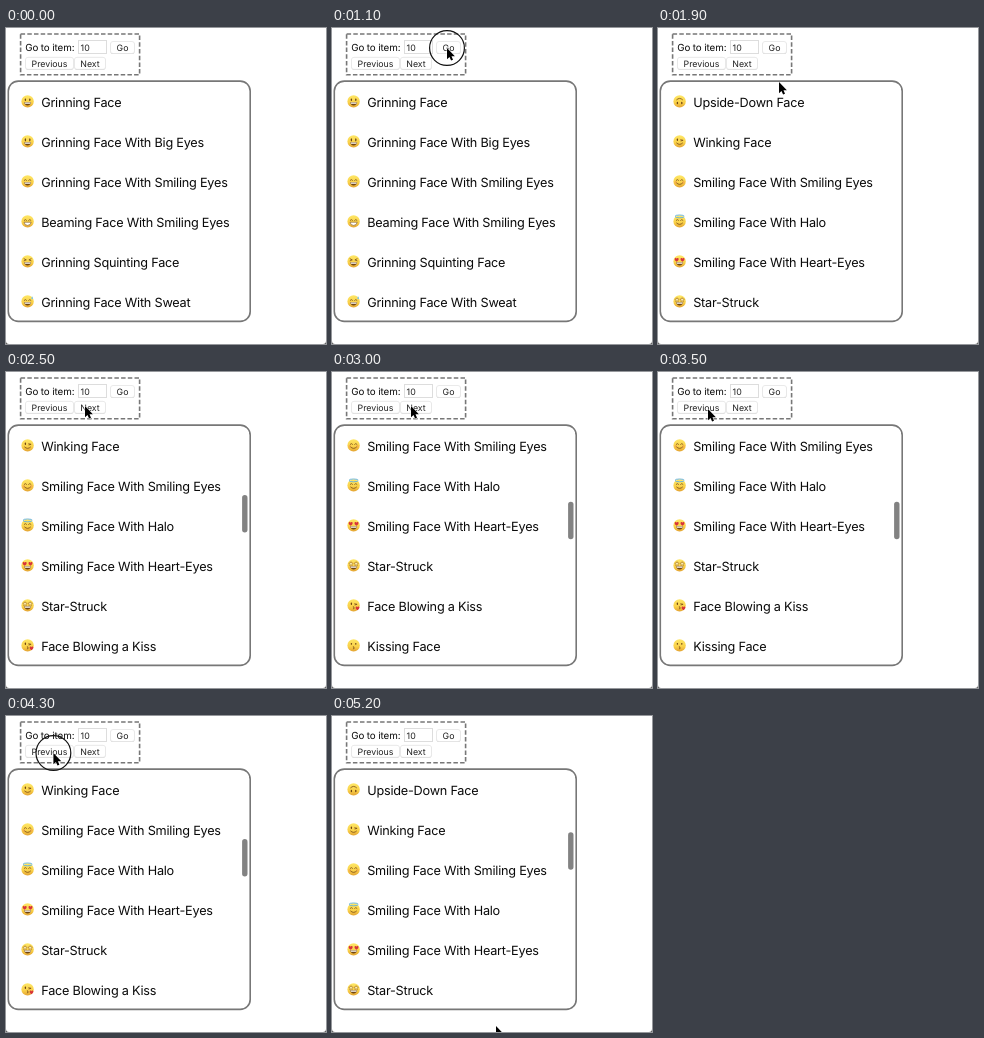
Animation of 320 by 316 pixels, one loop 5300 ms. Source, as an HTML page:

```html
<!DOCTYPE html>
<html lang="en">
<head>
<meta charset="utf-8">
<title>Scroll to item</title>
<style>
  html, body { margin: 0; width: 100%; height: 100%; overflow: hidden; background: #fff; }
  svg { display: block; width: 320px; height: 316px; }
  text { font-family: Inter, Roboto, "Liberation Sans", sans-serif; fill: #0a0a0a; text-rendering: geometricPrecision; }
  .row { font-size: 12.7px; letter-spacing: -.23px; }
  .label { font-size: 9.8px; letter-spacing: -.1px; }
  .small { font-size: 8.8px; fill: #222; }
  .line { fill: none; stroke: #7a4d17; stroke-width: .8; stroke-linecap: round; }
  .dark { fill: #6f4413; }
  .frame { fill: none; stroke: #777; stroke-width: 1.6; }
</style>
</head>
<body>
<svg viewBox="0 0 320 316" xmlns="http://www.w3.org/2000/svg">
  <defs>
    <linearGradient id="skin" x1="0" y1="0" x2="0" y2="1">
      <stop offset="0" stop-color="#fee766"/>
      <stop offset=".6" stop-color="#f9d048"/>
      <stop offset="1" stop-color="#e3a233"/>
    </linearGradient>
    <clipPath id="view"><rect x="2" y="53" width="242" height="240" rx="9"/></clipPath>
  </defs>
  <rect width="320" height="316" fill="#fff"/>
  <path d="M0 313Q0 316 3 316H0ZM320 313Q320 316 317 316H320Z" fill="#555"/>

  <rect class="frame" x="14.6" y="6" width="119" height="40.8" stroke-dasharray="4.5 2.2"/>
  <text class="label" x="19.2" y="23">Go to item:</text>
  <rect x="72.5" y="12.5" width="28" height="13" fill="#fff" stroke="#ddd"/>
  <text class="small" x="74.6" y="22.6">10</text>
  <g id="buttons"></g>

  <g clip-path="url(#view)"><g id="rows"></g></g>
  <rect class="frame" x="2.3" y="53.1" width="241.9" height="240.3" rx="10"/>
  <rect id="thumb" x="236.1" width="5.4" height="37.5" rx="2.7" fill="#828282"/>

  <circle id="ring" r="17.4" fill="none" stroke="#111" stroke-width="1.2"/>
  <path id="cursor" d="M0 0V11.2L2.5 8.9L4.1 12.6L6 11.8L4.5 8.2H7.9Z"
        fill="#000" stroke="#fff" stroke-width=".9" paint-order="stroke"/>
</svg>
<script>
const LOOP = 5300, STEP = 100, ROW = 40;
const $ = id => document.getElementById(id);

// Face parts, centred on 0,0 with a radius of 6
const line = d => `<path class="line" d="${d}"/>`;
const pair = draw => draw(-2.2) + draw(2.2);
const dots = (ry = 1.2) => pair(x => `<ellipse class="dark" cx="${x}" cy="-1.6" rx=".7" ry="${ry}"/>`);
const arcs = pair(x => line(`M${x - 1.2} -1.1q1.2 -1.7 2.4 0`));
const squint = line("M-3.5 -2.6L-1.3 -1.5L-3.5 -.6M3.5 -2.6L1.3 -1.5L3.5 -.6");
const grin = `<path class="dark" d="M-3.6 .9H3.6Q3 4 0 4T-3.6 .9Z"/>
  <path fill="#fff" d="M-3.2 1H3.2L2.7 2.3H-2.7Z"/>`;
const teeth = `<path d="M-3.6 .8H3.6Q3 4 0 4T-3.6 .8Z" fill="#fff" stroke="#7a4d17" stroke-width=".6"/>`;
const smile = line("M-2.9 1.7Q0 4.5 2.9 1.7");
const blush = pair(x => `<circle cx="${x * 1.75}" cy="1" r="1.3" fill="#f08a4b" opacity=".45"/>`);
const heart = (x, y, s) => `<path transform="translate(${x} ${y}) scale(${s})" fill="#d8343a"
  d="M0 2C-3 0 -2.2 -2 -1 -2Q0 -2 0 -1Q0 -2 1 -2C2.2 -2 3 0 0 2Z"/>`;
const star = x => `<path transform="translate(${x} -1.6)" fill="#fff3b0" stroke="#a8701f" stroke-width=".6"
  d="M0 -2.2L.7 -.8L2.2 -.7L1.1 .4L1.4 1.9L0 1.1L-1.4 1.9L-1.1 .4L-2.2 -.7L-.7 -.8Z"/>`;
const wink = `<ellipse class="dark" cx="-2.2" cy="-1.6" rx=".7" ry="1.2"/>` + line("M1.1 -1.6L3.5 -1.1L1.4 -.5");
const pucker = line("M-.3 1.3Q1.4 1.7 .1 2.4Q1.4 2.9 -.3 3.5");
const drop = `<path fill="#7fc4e8" d="M4.5 -5.2Q6.4 -2.6 4.6 -2.2Q2.9 -2.4 4.5 -5.2Z"/>`;
const halo = `<ellipse cy="-5" rx="4.6" ry="1.4" fill="none" stroke="#6fb6d6" stroke-width="1"/>`;

const items = [
  ["Grinning Face", dots() + grin],
  ["Grinning Face With Big Eyes", dots(1.6) + grin],
  ["Grinning Face With Smiling Eyes", arcs + grin],
  ["Beaming Face With Smiling Eyes", arcs + teeth],
  ["Grinning Squinting Face", squint + grin],
  ["Grinning Face With Sweat", arcs + grin + drop],
  ["Rolling on the Floor Laughing", squint + grin],
  ["Face With Tears of Joy", arcs + grin],
  ["Slightly Smiling Face", dots() + smile],
  ["Upside-Down Face", `<g transform="rotate(180)">${dots() + smile}</g>`],
  ["Winking Face", wink + smile],
  ["Smiling Face With Smiling Eyes", blush + arcs + smile],
  ["Smiling Face With Halo", arcs + smile + halo],
  ["Smiling Face With Heart-Eyes", heart(-2.9, -1.5, .95) + heart(2.9, -1.5, .95) + grin],
  ["Star-Struck", star(-2.6) + star(2.6) + grin],
  ["Face Blowing a Kiss", wink + pucker + heart(3.9, 3, .9)],
  ["Kissing Face", dots(.9) + pucker]
];

$("rows").innerHTML = items.map(([name, face], i) => `
  <g transform="translate(0 ${i * ROW})">
    <g transform="translate(21.6 73.4)"><circle r="6.2" fill="url(#skin)"/>${face}</g>
    <text class="row" x="35.2" y="79">${name}</text>
  </g>`).join("");

const button = (label, x, y, w) => `
  <rect x="${x + .5}" y="${y + .7}" width="${w - 1}" height="12.3" rx="2.5" fill="#c8c8c8"/>
  <rect x="${x + .5}" y="${y + .5}" width="${w - 1}" height="12" rx="2.5" fill="#fff" stroke="#e4e4e4" stroke-width=".7"/>
  <text class="small" x="${x + w / 2}" y="${y + 9.7}" text-anchor="middle">${label}</text>`;
$("buttons").innerHTML = button("Go", 104, 13, 25) + button("Previous", 19, 28.8, 49) + button("Next", 68, 28.8, 32);

// Time, x, y of the pointer tip
const path = [
  [0, 165, 335], [100, 150, 262], [300, 128, 120], [400, 124, 60], [500, 122, 20],
  [600, 122, 3], [700, 119, 12], [800, 115, 20], [1400, 115, 20], [1700, 117, 38],
  [1900, 121, 54], [2000, 112, 52], [2100, 92, 42], [2200, 79, 34], [3100, 79, 34],
  [3400, 51, 37], [3500, 50, 37], [3700, 47.4, 37], [4700, 47.4, 37], [4800, 50, 42],
  [4900, 66, 85], [5000, 95, 160], [5100, 130, 240], [5200, 164, 310], [5300, 165, 335]
];
const jumps = [[0, 0], [1200, 9], [2400, 10], [2900, 11], [3900, 10], [4400, 9]];
const clicks = [1100, 2300, 3800, 4300];
const fades = [1700, 3500];

function pointer(t) {
  const k = path.findIndex(p => p[0] > t);
  const [a, b] = [path[k - 1], path[k]];
  const f = (t - a[0]) / (b[0] - a[0]);
  return [a[1] + (b[1] - a[1]) * f, a[2] + (b[2] - a[2]) * f];
}

function draw(now) {
  const t = Math.floor(now % LOOP / STEP) * STEP;
  const [x, y] = pointer(t);
  const [since, first] = jumps.filter(j => j[0] <= t).pop();
  const fade = fades.find(f => f > since && f - since < 700);
  const alpha = !first ? 0 : fade ? Math.min(1, Math.max(0, 1 - (t - fade) / 200)) : 1;

  $("rows").setAttribute("transform", `translate(0 ${-first * ROW})`);
  $("thumb").setAttribute("y", 56 + first * 6.7);
  $("thumb").setAttribute("opacity", alpha);
  for (const id of ["cursor", "ring"]) $(id).setAttribute("transform", `translate(${x} ${y})`);
  $("ring").setAttribute("opacity", clicks.some(c => t >= c && t < c + 200) ? 1 : 0);
}

const start = performance.now();
function tick() {
  draw(performance.now() - start);
  requestAnimationFrame(tick);
}
tick();
</script>
</body>
</html>
```
